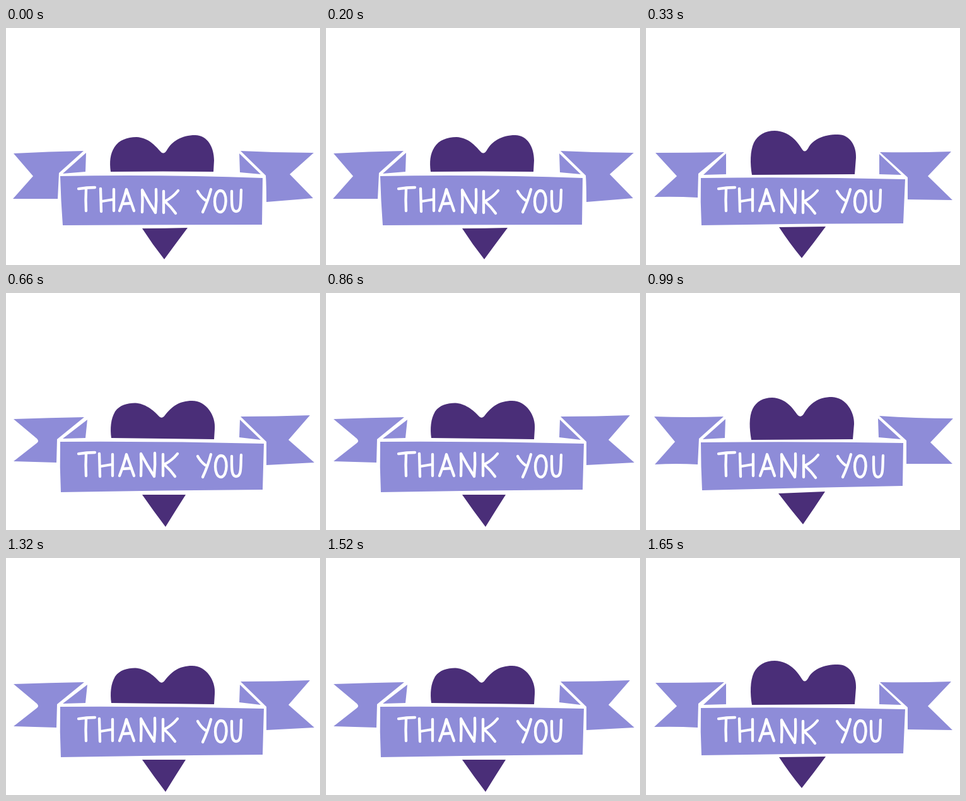
Recreate the animation shown at these times as an HTML page. Size 498 px wide and 376 px high, loop 1.98 s.

```html
<!DOCTYPE html>
<html lang="en">
<head>
<meta charset="utf-8">
<title>Thank you</title>
<style>
  html, body { margin: 0; width: 100%; height: 100%; overflow: hidden; background: #fff; }
  svg { display: block; width: 100vw; height: 100vh; }
  .heart { fill: #4a2e78; }
  .ribbon { fill: #8e8cd8; }
  .letter { fill: none; stroke: #fff; stroke-width: 4.3; stroke-linecap: round; stroke-linejoin: round; }
</style>
</head>
<body>
<svg id="art" viewBox="0 0 498 376" role="img" aria-label="THANK YOU"></svg>
<script>
const STEP = 330;
const ORDER = [0, 1, 2, 3, 2, 1];

// Each letter is a set of pen strokes.
const LETTERS = [
  "M115 255Q128 253 141 253M127 256Q126 273 127 290",
  "M148 255L149 291M169 256L169 290M150 275L168 272",
  "M180 290Q187 272 191 256Q197 273 203 290M184 279L199 278",
  "M214 290Q215 272 214 255Q224 274 235 291Q237 272 236 254",
  "M249 256L249 290M272 255Q263 266 251 272Q261 281 268 291",
  "M304 259Q309 268 316 273M325 256Q320 275 312 292",
  "M341 258C329 259 329 292 341 292C352 291 353 258 341 258",
  "M358 259C358 277 357 291 365 291C374 291 372 275 373 257"
];

const POSES = [
  {
    heart: "M166 228C164 212 165 200 172 189C179 178 192 173 207 173C226 174 237 187 245 196Q250 202 255 194C263 180 278 170 300 170C320 170 330 190 330 210L329 228Q250 227 166 228ZM216 318Q252 318 288 317Q270 341 251 367Q232 343 216 318Z",
    ribbon: [
      "M12 199Q68 196 123 195L84 230L82 271L11 271L43 235Z",
      "M127 198L126 228L90 231Z",
      "M86 235Q246 232 407 238L406 312Q248 312 90 313Q87 274 86 235Z",
      "M372 195Q430 198 488 198L450 232L487 270L413 276Q413 250 412 234Z",
      "M370 199L404 232L371 229Z"
    ],
    shift: [[0, 0], [2, 0], [0, 0], [2, 2], [1, 3], [0, 0], [-1, 0], [0, 0]]
  },
  {
    heart: "M168 233C165 215 165 195 171 182C177 170 189 163 204 163C228 164 240 180 248 193Q252 199 257 191C264 177 281 169 304 169C324 169 334 188 333 206L331 232ZM211 316L285 315Q266 341 247 365Q228 342 211 316Z",
    ribbon: [
      "M15 198Q70 198 124 197L83 231L82 269Q48 267 13 268L49 235Z",
      "M127 199L127 232L91 233Z",
      "M87 238Q250 236 411 240L408 310Q248 310 88 313Q86 276 87 238Z",
      "M371 197Q428 198 484 196L447 235L486 273L415 272L415 237Z",
      "M370 200L405 233L370 232Z"
    ],
    shift: [[0, 0], [0, 0], [0, 0], [1, 2], [0, 3], [-1, 0], [-1, 0], [-1, 0]]
  },
  {
    heart: "M167 230C165 215 166 200 173 188C180 178 192 174.5 205 174.5C220 175 234 186 242 195Q247 201 252 194C263 180 275 171 295 171C318 171 333 195 331 216L330 232ZM216 320L285 320Q269 345 253 371Q234 346 216 320Z",
    ribbon: [
      "M12 200Q68 198 124 197L81 232L80 269L12 267L49 238Q53 235 49 231Z",
      "M129 201L126 230L90 231Z",
      "M86 236Q247 235 409 239L407 312Q247 313 87 316Q85 276 86 236Z",
      "M372 196Q428 196 482 194L448 233L489 269L413 273L413 236Z",
      "M371 201L404 233L370 229Z"
    ],
    shift: [[0, 0], [0, 0], [0, 0], [0, 0], [0, 0], [0, 0], [0, 0], [0, 0]]
  },
  {
    heart: "M167 233C164 215 163 197 169 184C175 172 186 166 200 166C222 167 233 183 240 193Q245 199 250 192C260 175 273 165 295 165C318 166 331 190 330 208L328 232ZM210 318L284 315Q267 341 249 367Q229 343 210 318Z",
    ribbon: [
      "M13 196Q68 198 123 196L84 231L82 272Q48 270 14 272L46 236Z",
      "M126 200L125 230L90 232Z",
      "M87 237Q247 235 408 238L407 306Q248 309 89 313Q87 275 87 237Z",
      "M370 195Q428 199 487 199L451 237L486 271L413 271L413 234Z",
      "M368 199L404 232L369 229Z"
    ],
    shift: [[0, 0], [1, 0], [1, 0], [1, 1], [1, 2], [0, 0], [-1, 0], [3, 1]]
  }
];

const svg = document.getElementById("art");

function add(parent, tag, attrs = {}) {
  const node = document.createElementNS("http://www.w3.org/2000/svg", tag);
  for (const key in attrs) node.setAttribute(key, attrs[key]);
  return parent.appendChild(node);
}

const layers = POSES.map(pose => {
  const layer = add(svg, "g", { visibility: "hidden" });
  add(layer, "path", { class: "heart", d: pose.heart });
  add(layer, "path", { class: "ribbon", d: pose.ribbon.join("") });
  LETTERS.forEach((d, i) =>
    add(layer, "path", { class: "letter", d, transform: `translate(${pose.shift[i]})` }));
  return layer;
});

const start = performance.now();

function draw() {
  const step = Math.floor((performance.now() - start) / STEP) % ORDER.length;
  layers.forEach((layer, i) =>
    layer.setAttribute("visibility", i === ORDER[step] ? "visible" : "hidden"));
  requestAnimationFrame(draw);
}
draw();
</script>
</body>
</html>
```
